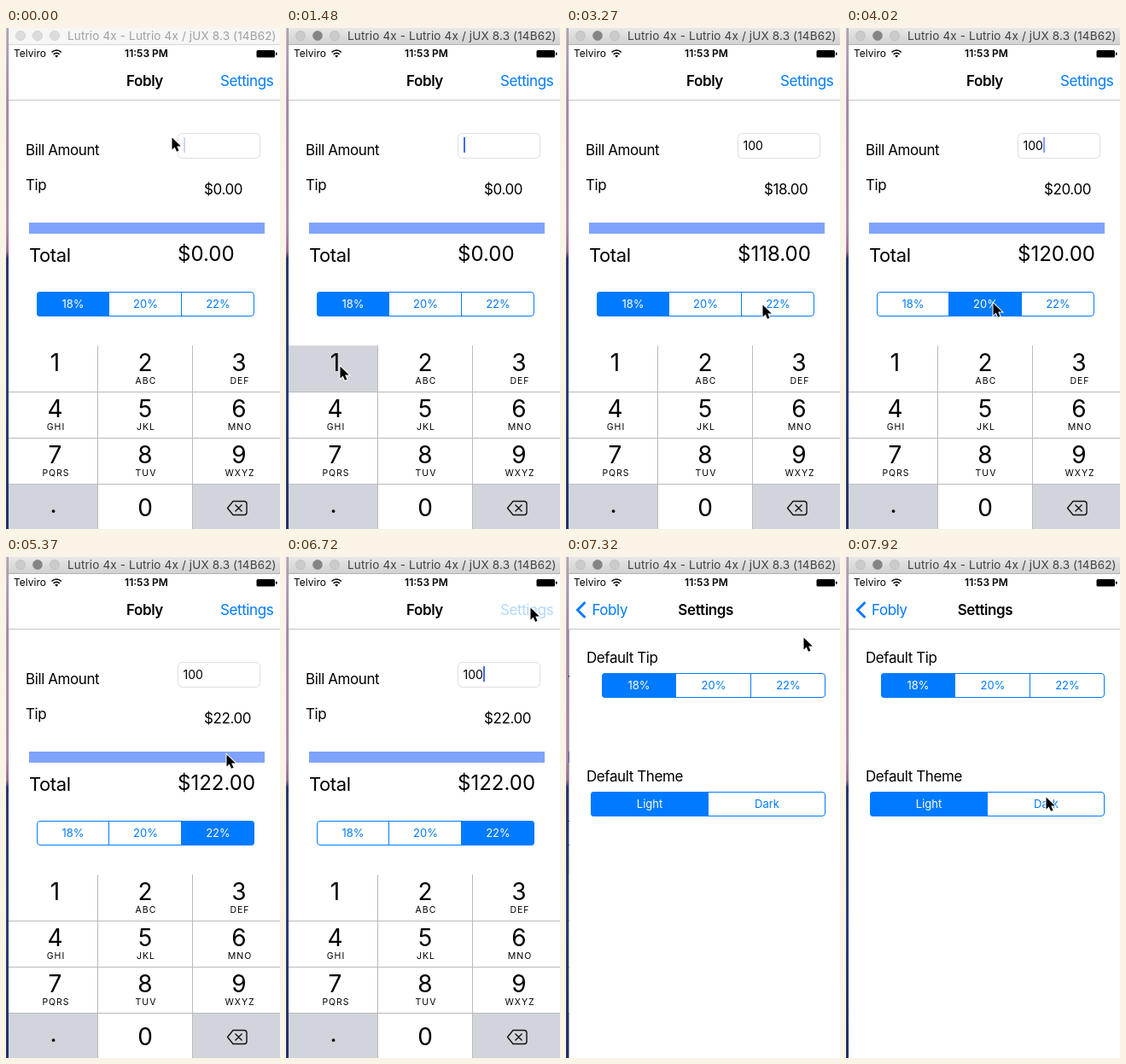
These frames come from a looping animation (321 px wide and 587 px high, 8000 ms). An HTML page:

```html
<!DOCTYPE html>
<html lang="en">
<head>
<meta charset="utf-8">
<title>Tip calculator demo</title>
<style>
  html, body { margin: 0; width: 100%; height: 100%; overflow: hidden; background: #fff; }
  svg { display: block; width: 321px; height: 587px; font-family: Inter, "Open Sans", sans-serif; }
  text { white-space: pre; }
</style>
</head>
<body>
<svg id="stage" viewBox="0 0 321 587"></svg>
<script>
const stage = document.getElementById('stage');
const LOOP = 8000, STEP = 150, LAG = 30;
const BLUE = '#007aff', GREY_KEY = '#d1d4db';

// Pointer stops: time, x, y
const pointerPath = [
  [290, 194, 128], [1180, 63, 396], [1630, 63, 396], [2080, 162, 553],
  [2970, 162, 553], [3270, 230, 324], [3420, 230, 324], [3870, 172, 322],
  [4080, 172, 322], [4470, 240, 324], [5070, 240, 324], [5370, 258, 231],
  [5670, 257, 195], [5850, 257, 195], [6570, 286, 59], [7170, 286, 59], [7770, 234, 281]
];

const clamp = v => Math.max(0, Math.min(1, v));
const mix = (a, b, k) => a + (b - a) * k;

function pointerAt(t) {
  const i = pointerPath.findIndex(stop => stop[0] > t);
  if (i === 0) return pointerPath[0].slice(1);
  if (i < 0) return pointerPath.at(-1).slice(1);
  const [t0, x0, y0] = pointerPath[i - 1], [t1, x1, y1] = pointerPath[i];
  const k = (t - t0) / (t1 - t0), e = k * k * (3 - 2 * k);
  return [mix(x0, x1, e), mix(y0, y1, e)];
}

// Critically damped spring used by the screen push
function pushAt(t) {
  const w = Math.max(0, t - 6880) * 0.0183;
  return 1 - (1 + w) * Math.exp(-w);
}

// Blinks with soft fades; stays solid while typing
function caretAt(t) {
  if (t > 1040 && t < 2975) return 1;
  const p = (t < 2975 ? t + 145 : t - 2975) % 975;
  return p < 500 ? clamp(1 - p / 200) : clamp((p - 500) / 200);
}

const rect = (x, y, w, h, fill, more = '') =>
  `<rect x="${x}" y="${y}" width="${w}" height="${h}" fill="${fill}" ${more}/>`;
const path = (d, more) => `<path d="${d}" ${more}/>`;
const group = (content, more) => `<g ${more}>${content}</g>`;
const shift = (x, y = 0) => `transform="translate(${Math.round(x)} ${Math.round(y)})"`;

function text(x, y, str, size = 17, more = '') {
  const spacing = size > 14 && size < 24 ? -0.41 : 0;
  return `<text x="${x}" y="${y}" font-size="${size}" letter-spacing="${spacing}" ${more}>${str}</text>`;
}
const centred = (x, y, str, size, more = '') => text(x, y, str, size, `text-anchor="middle" ${more}`);

function segments(edges, y, labels, selected) {
  const left = edges[0], right = edges.at(-1), id = `seg${y}`;
  let out = `<clipPath id="${id}">${rect(left, y, right - left, 29, '#000', 'rx="4"')}</clipPath>`;
  out += rect(edges[selected], y, edges[selected + 1] - edges[selected], 29, BLUE, `clip-path="url(#${id})"`);
  out += rect(left + .5, y + .5, right - left - 1, 28, 'none', `rx="3.5" stroke="${BLUE}"`);
  labels.forEach((label, i) => {
    if (i) out += rect(edges[i] - 1, y, 1, 29, BLUE);
    out += centred((edges[i] + edges[i + 1]) / 2, y + 19, label, 13,
      `fill="${i === selected ? '#fff' : BLUE}"`);
  });
  return out;
}

function keypad(pressed) {
  const keys = ['1', '2 ABC', '3 DEF', '4 GHI', '5 JKL', '6 MNO', '7 PQRS', '8 TUV', '9 WXYZ', '.', '0', '<'];
  const edges = [3, 108, 219, 321], middles = [57.5, 163, 273];
  let out = rect(3, 372, 318, 215, '#fff');
  keys.forEach((key, i) => {
    const col = i % 3, row = Math.floor(i / 3), y = 372 + 54 * row, x = middles[col];
    const [digit, letters] = key.split(' ');
    const grey = '.<'.includes(digit) || digit === pressed;
    if (grey) out += rect(edges[col], y, edges[col + 1] - edges[col], 54, GREY_KEY);
    if (digit === '<') {
      out += path('M266 554.5h13q3 0 3 3v10q0 3-3 3h-13l-6.5-8z M268.5 558.5l8 8m0-8l-8 8',
        'fill="none" stroke="#111" stroke-width="1.4" stroke-linejoin="round"');
    } else if (digit === '.') {
      out += centred(55.5, 568, '.', 28);
    } else {
      out += centred(x, row === 3 ? 572 : y + 30, digit, 28);
    }
    if (letters) out += `<text x="${x + 1}" y="${y + 45}" font-size="10.5" letter-spacing="1" text-anchor="middle">${letters}</text>`;
  });
  for (const y of [426, 480, 534]) out += rect(3, y, 318, 1, '#b9babd');
  for (const x of [107, 218]) out += rect(x, 372, 1, 215, '#b9babd');
  return out;
}

function calculator(t, push) {
  const bill = t < 1600 ? '' : t < 2200 ? '1' : t < 2500 ? '10' : '100';
  const choice = t < 3870 ? 0 : t < 4620 ? 1 : 2;
  const tip = bill * [.18, .2, .22][choice];
  const money = v => '$' + v.toFixed(2);
  const pressed = t > 1400 && t < 1600 ? '1'
    : (t > 2050 && t < 2200) || (t > 2350 && t < 2500) ? '0' : '';
  const caretX = 208 + (bill ? 9 * bill.length - 4 : 0);
  return rect(3, 20, 318, 567, '#fff')
    + text(23, 149, 'Bill Amount')
    + rect(201.5, 123.5, 96, 29, '#fff', 'rx="5" stroke="#dedede"')
    + text(207.5, 143, bill, 14)
    + rect(caretX, 128, 2, 18, '#426bf2', `opacity="${caretAt(t)}"`)
    + text(23, 190, 'Tip')
    + text(232, 195, money(tip))
    + rect(27, 228, 276, 13, '#7fa3fc')
    + text(27, 274, 'Total', 22)
    + text(201, 273, money(+bill + tip), 24)
    + segments([36, 121, 206, 291], 309, ['18%', '20%', '22%'], choice)
    + rect(3, 20, 420, 352, '#000', `opacity="${.1 * push}"`)
    + keypad(pressed);
}

function settings() {
  return rect(-5, 20, 8, 567, 'url(#shadow)')
    + rect(3, 20, 318, 567, '#fff')
    + text(23, 124, 'Default Tip')
    + segments([41, 128, 216, 303], 136, ['18%', '20%', '22%'], 0)
    + text(23, 263, 'Default Theme')
    + segments([28, 166, 303], 275, ['Light', 'Dark'], 0);
}

function navBar(t, push) {
  const late = push ** 1.2, bold = 'font-weight="600"';
  const buttonFade = t > 6700 ? .3 * (1 - push) : 1;
  const appX = mix(141, 30, late);
  return rect(3, 20, 318, 64, '#fff', 'opacity=".6"')
    + rect(3, 84, 318, 1, '#c4c4c6')
    + text(251, 68, 'Settings', 17, `fill="${BLUE}" opacity="${buttonFade}"`)
    + text(appX, 68, 'Fobly', 17, `${bold} opacity="${clamp(1 - push * 1.5)}"`)
    + text(appX, 68, 'Fobly', 17, `fill="${BLUE}" opacity="${clamp(push * 1.1)}"`)
    + path('M22.5 53l-9 9 9 9', `fill="none" stroke="${BLUE}" stroke-width="3" opacity="${push ** 6}"`)
    + centred(mix(350, 163, late), 68, 'Settings', 17, `${bold} opacity="${push}"`);
}

function statusBar() {
  return text(9, 34, 'Telviro', 12)
    + centred(164.5, 34, '11:53 PM', 12, 'font-weight="600"')
    + path('M53.5 28.5q5.7-5 11.4 0M55.6 30.9q3.6-3 7.2 0', 'fill="none" stroke="#000" stroke-width="1.6"')
    + path('M57.2 32.6q2-1.6 4 0l-2 2.2z', '')
    + rect(293.5, 26, 21.5, 8.5, '#000', 'rx="1.5"')
    + rect(316, 28.5, 1.5, 3.5, '#000', 'rx=".7"');
}

function titleBar(active) {
  const dots = [17, 37, 57].map((x, i) => {
    const fill = !active ? '#dcdcdc' : i === 1 ? '#858585' : '#cbcbcb';
    return `<circle cx="${x}" cy="9" r="5.7" fill="${fill}" stroke="#000" stroke-opacity=".08"/>`;
  }).join('');
  return rect(3, 0, 318, 19, active ? 'url(#chrome)' : '#f6f6f6')
    + rect(3, 19, 318, 1, active ? '#b4b3b4' : '#d4d4d4')
    + dots
    + `<text x="72" y="14" font-size="13.5" letter-spacing=".15" fill="${active ? '#404040' : '#a0a0a0'}">Lutrio 4x - Lutrio 4x / jUX 8.3 (14B62)</text>`;
}

const gradient = (id, direction, stops) =>
  `<linearGradient id="${id}" ${direction}>${stops.map(([at, colour, alpha = 1]) =>
    `<stop offset="${at}" stop-color="${colour}" stop-opacity="${alpha}"/>`).join('')}</linearGradient>`;
const down = 'x1="0" y1="0" x2="0" y2="1"';
const defs = '<defs>'
  + gradient('chrome', down, [[0, '#e9e8e9'], [1, '#d2d1d2']])
  + gradient('shadow', '', [[0, '#000', 0], [1, '#000', .25]])
  + gradient('edge', '', [[0, '#000', .05], [1, '#000', .3]])
  + gradient('desktop', down, [[0, '#d9cfe0'], [.15, '#c9a9d6'], [.4, '#d5a3c9'], [.445, '#c08ab4'],
      [.46, '#37437f'], [.7, '#2f4f8f'], [1, '#27397a']])
  + '</defs>';

function render(t) {
  const push = pushAt(t), [x, y] = pointerAt(t);
  stage.innerHTML = defs
    + group(calculator(t, push), shift(-96 * push))
    + (push > 0 ? group(settings(), shift(318 * (1 - push))) : '')
    + navBar(t, push)
    + statusBar()
    + titleBar(t > 1100)
    + rect(0, 0, 3, 587, 'url(#desktop)')
    + rect(0, 0, 3, 587, 'url(#edge)')
    + path('M.5.5v14l3.2-3 2.3 5.3 2.5-1.1-2.3-5.2h4.6z',
        `${shift(x, y)} stroke="#fff" stroke-width="2" paint-order="stroke"`);
}

let shown = -1;
function tick() {
  const now = performance.now() % LOOP;
  const held = Math.max(0, Math.floor((now + LAG) / STEP) * STEP - LAG);
  if (held !== shown) render(shown = held);
  requestAnimationFrame(tick);
}
tick();
</script>
</body>
</html>
```
